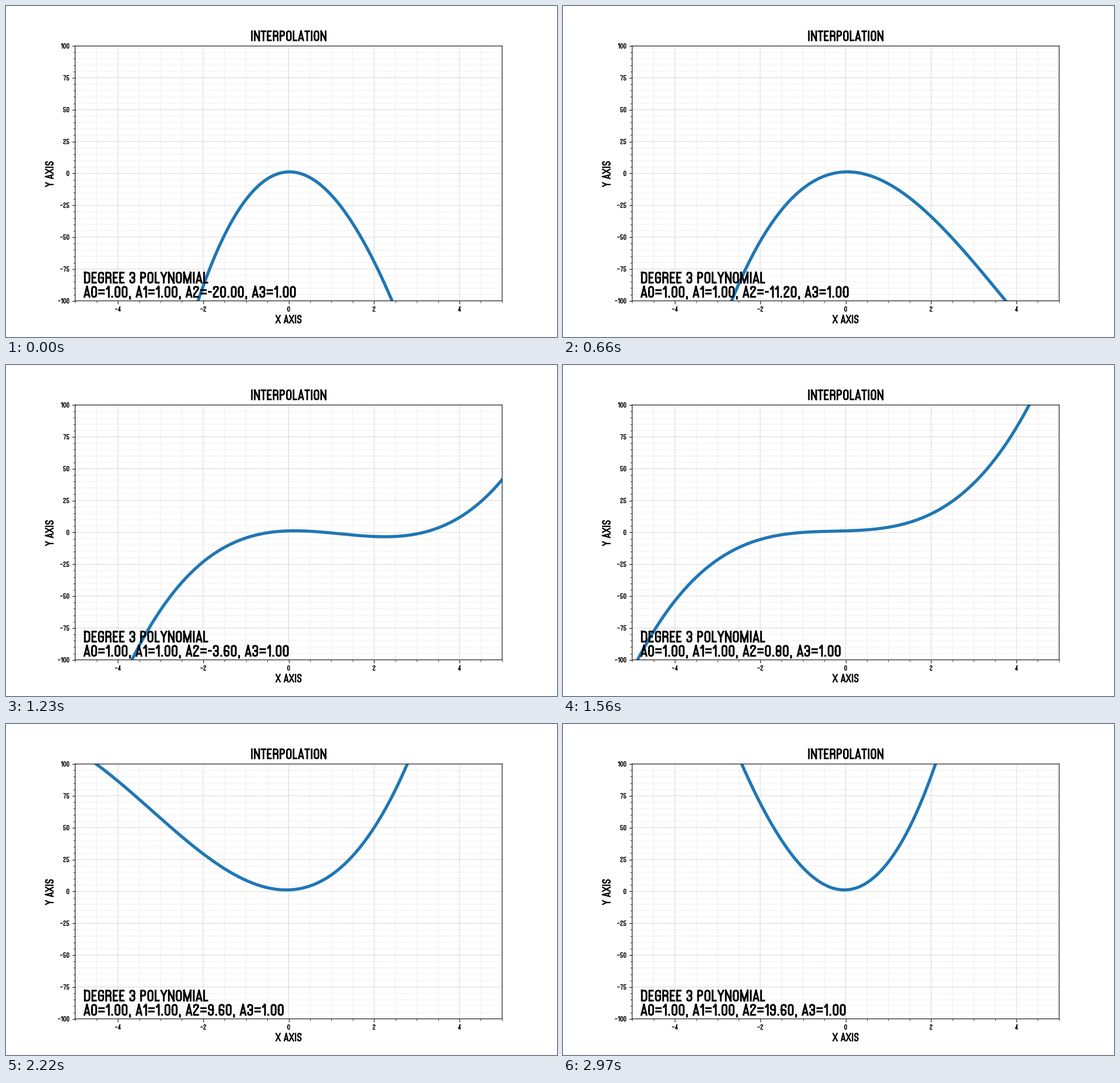
Animation of 966 by 580 pixels, one loop 3 s. Source, as a matplotlib script:

```python
import numpy as np
import matplotlib.pyplot as plt
from matplotlib.animation import FuncAnimation
from matplotlib.patches import PathPatch
from matplotlib.path import Path
from matplotlib.ticker import MultipleLocator
from matplotlib.transforms import Affine2D, IdentityTransform

plt.rcParams["path.snap"] = False

W, H, DPI = 966, 580, 72          # at 72 dpi one point is one pixel
FRAMES, INTERVAL = 100, 30

# Condensed stroke lettering, measured in em.
# Each glyph is strokes between keys on a grid five columns wide.
CAP, STEM, RADIUS, BEARING = 0.7, 0.105, 0.14, 0.035
KEYS = "abcdefghijklmnopqrstuvwxyzABCDEFGHIJKLMN"
ROWS = (1, 0.79, 0.5, 0.21, 0, -0.18, 0.67, 0.33)
STROKES = {
    "A": "uc yc qs", "D": "aeyua", "E": "eauy kn", "G": "jeauyom",
    "I": "cw", "L": "auy", "M": "ua aw we ey", "N": "ua ay ye",
    "O": "kaeyuk", "P": "uaeok", "R": "uaeok moy", "S": "jeakoyup",
    "T": "ae cw", "X": "ay eu", "Y": "am em mw",
    "0": "kaeyuk", "1": "ey fd", "2": "faejpuy", "3": "faeom moyup",
    "4": "dx dp pt", "5": "eakoyup", "6": "jeauyok", "7": "aew",
    "8": "mkaeom mkuyom", "9": "puyeako",
    "=": "EI JN", "-": "ko", "\u2212": "ko", ".": "w", ",": "wB", " ": "",
}
ROUND = {
    "D": "ey", "G": "aeuy", "O": "aeuy", "P": "eo", "R": "eo", "S": "aekouy",
    "0": "aeuy", "2": "ae", "3": "aeouy", "5": "ouy", "6": "aeouy",
    "8": "aekouy", "9": "aekuy",
}
ADVANCE = {
    "D": 0.445, "E": 0.385, "G": 0.436, "I": 0.2, "L": 0.365, "M": 0.57,
    "N": 0.465, "O": 0.436, "R": 0.443, "T": 0.385, "X": 0.45, "1": 0.3,
    "=": 0.455, "-": 0.3, "\u2212": 0.4, ".": 0.213, ",": 0.213, " ": 0.22,
}


def advance(ch):
    return ADVANCE.get(ch, 0.423)


def grid_point(key, ch):
    row, col = divmod(KEYS.index(key), 5)
    inset = STEM / 2 + (0.01 if ch in "ATXY" else BEARING)
    x = inset + col / 4 * (advance(ch) - 2 * inset)
    return np.array([x, STEM / 2 + ROWS[row] * (CAP - STEM)])


def toward(p, q):
    d = q - p
    dist = np.hypot(*d)
    return p + d * min(RADIUS / dist, 0.5)


def stroke_path(keys, ch):
    pts = [grid_point(k, ch) for k in keys]
    if len(pts) == 1:
        pts.append(pts[0] + (0, 0.01))
    verts, codes = [pts[0]], [Path.MOVETO]
    for i in range(1, len(pts)):
        if i < len(pts) - 1 and keys[i] in ROUND.get(ch, ""):
            verts += [toward(pts[i], pts[i - 1]), pts[i],
                      toward(pts[i], pts[i + 1])]
            codes += [Path.LINETO, Path.CURVE3, Path.CURVE3]
        else:
            verts.append(pts[i])
            codes.append(Path.LINETO)
    return Path(verts, codes)


GLYPHS = {ch: [stroke_path(s, ch) for s in spec.split()]
          for ch, spec in STROKES.items()}


def text_path(text, x, y, size, align=0.0, angle=0):
    """Outline of a line of text; y is the baseline, counted from the top."""
    pen, parts = 0, []
    for ch in text:
        shift = Affine2D().translate(pen, 0)
        parts += [p.transformed(shift) for p in GLYPHS[ch]]
        pen += advance(ch)
    place = (Affine2D().translate(-align * pen, 0).scale(size)
             .rotate_deg(angle).translate(x, H - y))
    return Path.make_compound_path(*parts).transformed(place)


fig = plt.figure(figsize=(W / DPI, H / DPI), dpi=DPI, facecolor="white")


def write(text, x, y, size, align=0.0, angle=0):
    patch = PathPatch(text_path(text, x, y, size, align, angle), fill=False,
                      edgecolor="black", linewidth=STEM * size,
                      capstyle="projecting", joinstyle="miter",
                      transform=IdentityTransform())
    return fig.add_artist(patch)


# Axes: frame and grid sit half a pixel right of and below the data.
NUDGE = 0.48
ax = fig.add_axes([0.125 + NUDGE / W, 0.11 - NUDGE / H, 0.775, 0.77])
ax.set(xlim=(-5, 5), ylim=(-100, 100))
for axis, major, minor in ((ax.xaxis, 2, 0.5), (ax.yaxis, 25, 5)):
    axis.set_major_locator(MultipleLocator(major))
    axis.set_minor_locator(MultipleLocator(minor))
ax.tick_params(which="major", length=4.7, width=1.07,
               labelleft=False, labelbottom=False)
ax.tick_params(which="minor", length=2.7, width=0.8)
ax.grid(which="major", color="#b0b0b0", linestyle="--", linewidth=0.7)
ax.grid(which="minor", color="#dcdcdc", linestyle="--", linewidth=0.6)
ax.set_axisbelow(True)
for spine in ax.spines.values():
    spine.set_linewidth(1.07)


def to_px(x, y):
    px, py = ax.transData.transform((x, y))
    return px, H - py


def signed(v):
    return str(v).replace("-", "\u2212")


# Labels
MID_X, MID_Y = to_px(0, 0)
write("INTERPOLATION", MID_X, 61.6, 26.8, 0.5)
write("X AXIS", MID_X, 556.2, 21.5, 0.5)
write("Y AXIS", 83.5, MID_Y + 1, 21.5, 0.5, angle=90)
for v in range(-4, 5, 2):
    write(signed(v), to_px(v, 0)[0], 535.7, 13.4, 0.5)
for v in range(-100, 101, 25):
    write(signed(v), 111.3, to_px(0, v)[1] + 4.6, 13.4, 1)

NOTE = dict(x=135.7, size=29.5)
write("DEGREE 3 POLYNOMIAL", y=486.3, **NOTE)
coeffs = write("A0=1.00", y=511.2, **NOTE)

xs = np.linspace(-5, 5, 200)
curve, = ax.plot(xs, xs, color="#1f77b4", linewidth=5.4,
                 transform=ax.transData + Affine2D().translate(-NUDGE, NUDGE))


def update(i):
    a = (1, 1, -20 + 0.4 * i, 1)
    curve.set_ydata(sum(c * xs**n for n, c in enumerate(a)))
    text = ", ".join(f"A{n}={c:.2f}" for n, c in enumerate(a))
    coeffs.set_path(text_path(text, y=511.2, **NOTE))
    return curve, coeffs


anim = FuncAnimation(fig, update, frames=FRAMES, interval=INTERVAL,
                     repeat=True, repeat_delay=0)
plt.show()
```
